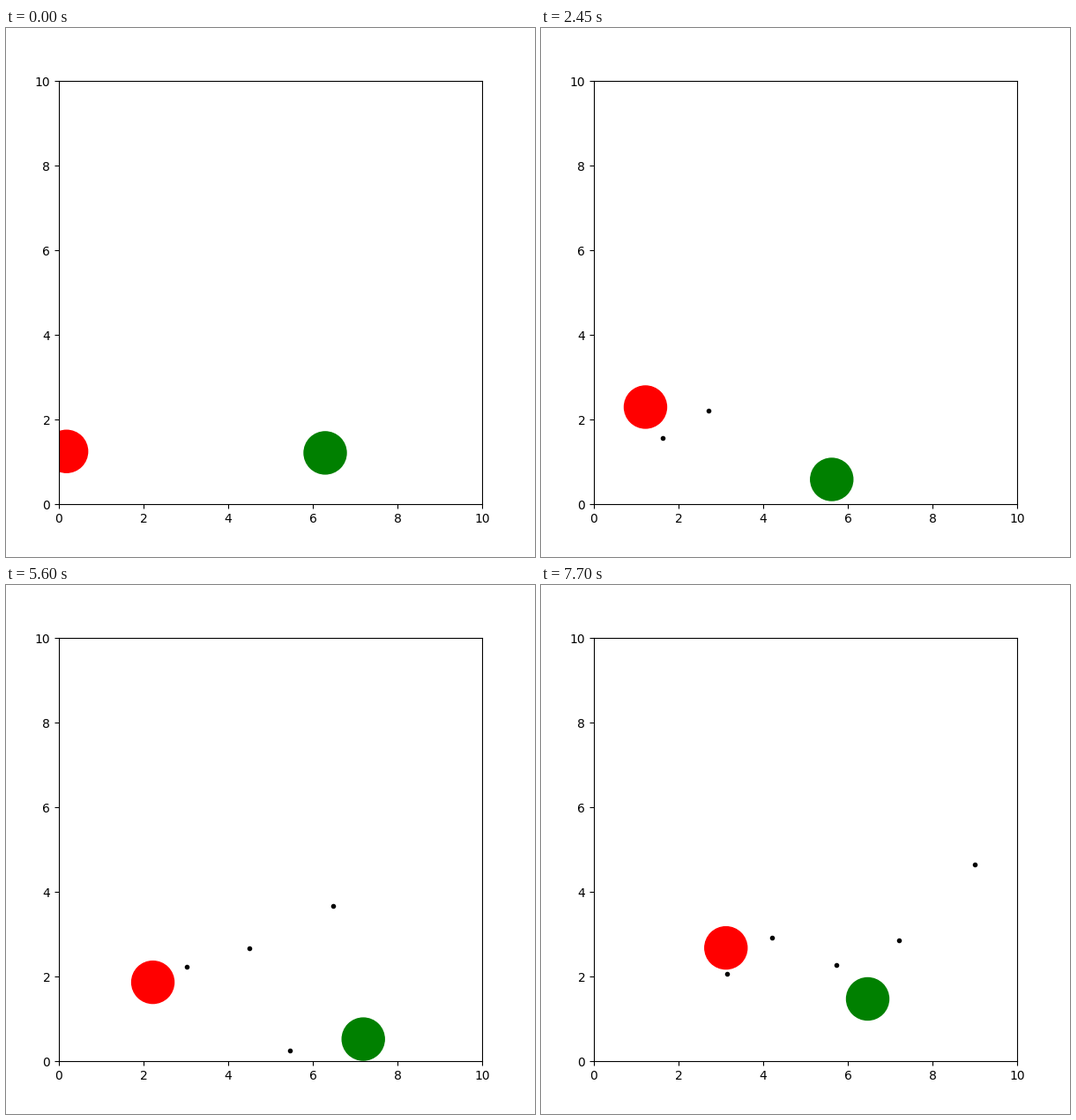
A matplotlib script that plays this animation: 600x600 px, repeating every 8000 ms.

```python
import numpy as np
import matplotlib.pyplot as plt
from matplotlib.animation import FuncAnimation

TICK = 50         # ms per drawn frame
HOLD = 7          # ticks for which each step stays on screen
TICKS = 160
SPEED = 0.45      # bullet distance per step
RELOAD = 4        # steps between shots
AIM = np.radians([21.1, -18.9, 4.1, 1.1, 27.9, -43.2])

# Walkers go straight between turns: (step, x, y)
RED_TURNS = [(0, 0.18, 1.245), (8.9, 1.50, 2.577), (12, 1.67, 2.20),
             (14, 1.92, 2.00), (16.4, 2.28, 1.835), (22, 3.12, 2.675)]
GREEN_TURNS = [(0, 6.292, 1.21), (2, 5.917, 1.188), (3.4, 5.675, 0.866),
               (5, 5.45, 0.833), (7, 5.62, 0.583), (11, 6.246, 0.406),
               (14, 6.844, 0.385), (17.3, 7.418, 0.607), (22, 6.469, 1.469)]


def locate(turns, step):
    steps, xs, ys = zip(*turns)
    return np.array([np.interp(step, steps, xs), np.interp(step, steps, ys)])


def bullet(shot, step):
    """Fly straight from where red stood; visible one step after the shot."""
    fired = shot * RELOAD
    heading = np.array([np.cos(AIM[shot]), np.sin(AIM[shot])])
    return locate(RED_TURNS, fired) + (step - fired - 1) * SPEED * heading


fig = plt.figure(figsize=(6, 6), dpi=100)
ax = fig.add_axes([0.1, 0.1, 0.8, 0.8])
ax.set(xlim=(0, 10), ylim=(0, 10))

red = ax.add_patch(plt.Circle((0, 0), 0.5, color="red"))
green = ax.add_patch(plt.Circle((0, 0), 0.5, color="green"))
bullets, = ax.plot([], [], "k.")


def update(tick):
    step = tick // HOLD
    red.center = locate(RED_TURNS, step)
    green.center = locate(GREEN_TURNS, step)
    shots = range((step + RELOAD - 1) // RELOAD)
    points = np.array([bullet(s, step) for s in shots]).reshape(-1, 2)
    bullets.set_data(points[:, 0], points[:, 1])
    return red, green, bullets


anim = FuncAnimation(fig, update, frames=TICKS, interval=TICK,
                     repeat=True, repeat_delay=0)
plt.show()
```
